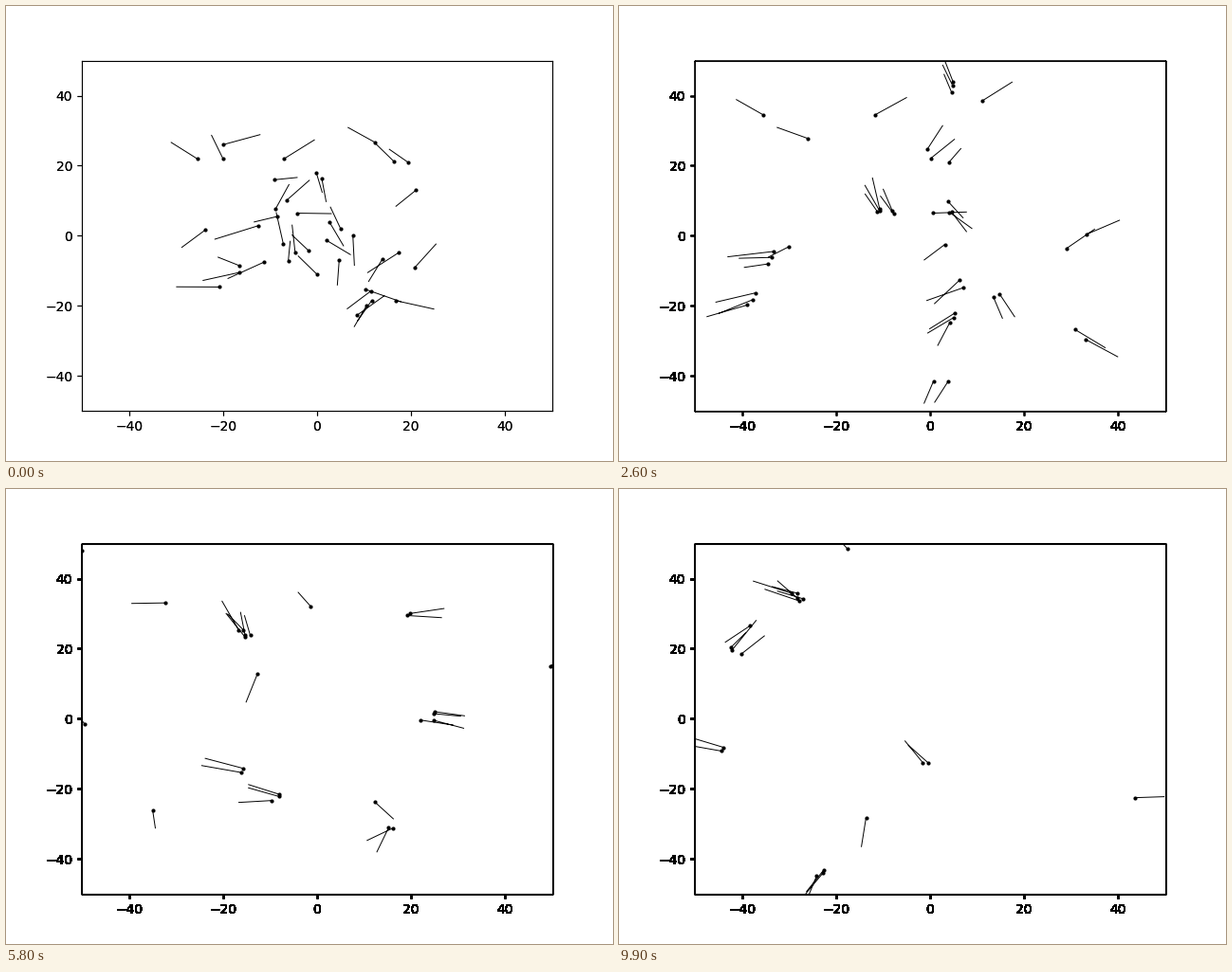
A matplotlib script that plays this animation: 640x480 px, repeating every 10000 ms.

```python
import numpy as np
import matplotlib.pyplot as plt
from matplotlib.animation import FuncAnimation

FRAMES, INTERVAL = 100, 100
STEP = 33     # frames between two key points of a route
SETTLE = 15   # frames a scattered flock needs to draw together

rng = np.random.default_rng(7)
t = np.arange(FRAMES)
tracks, lengths = [], []


def route(keys):
    """Smooth curve through the key points, straight on after the last."""
    keys = np.array(keys, float)
    slope = np.gradient(keys, axis=0)
    i = np.minimum(t // STEP, len(keys) - 2)
    u = (t / STEP - i)[:, None]
    s = np.minimum(u, 1)
    curve = ((1 + 2 * s) * (1 - s) ** 2 * keys[i] + s * (1 - s) ** 2 * slope[i]
             + s * s * (3 - 2 * s) * keys[i + 1] - s * s * (1 - s) * slope[i + 1])
    return curve + (u - s) * slope[-1]


def flock(size, spread, *keys):
    """Boids that start scattered, gather on one route and wander a little."""
    path = route(keys)
    for _ in range(size):
        offset = spread * rng.uniform(-1, 1, 2)
        phase = rng.uniform(0, 2 * np.pi, 2)
        scatter = offset * np.exp(-t / SETTLE)[:, None]
        wander = 0.8 * (np.sin(0.15 * t[:, None] + phase) - np.sin(phase))
        tracks.append(path + scatter + wander)
        lengths.append(rng.normal(7.2, 1.2))


# crossing to the right
flock(4, 8, (-1, 10), (5, 6), (30, -1), (57, -7))
flock(2, 4, (-6.5, 10.5), (2, 26), (25, 29.5), (55, 26))
flock(1, 0, (21, 13), (2, -5), (17, -26), (43, -21.5))
flock(2, 5, (5, 0), (16, -22), (14, -33), (-1, -14))

# drifting to the left
flock(5, 6, (-3, -6), (-11, 11), (-17, 28), (-28, 35))
flock(3, 7, (9, -13), (2, -26), (-13, -23), (-24, -44))
flock(2, 8, (15, -6), (4, -16), (-21, -13), (-43, -8))
flock(3, 9, (-21, 0), (-38, -6), (-52, 3), (-41, 20))
flock(1, 0, (-20, 22), (-26, 29), (-33, 32), (-37.5, 25.5))
flock(1, 0, (-20, 26), (-9, 34), (-13, 6), (-13, -27))
flock(1, 0, (-9, 16), (4, 22), (-6, 36), (-19, 49))
flock(1, 0, (-8.5, 5.5), (-33, -5), (-33, -32))

# leaving the stage early
flock(3, 7, (13, 20), (2, 48))
flock(1, 0, (-7, 22), (16, 42))
flock(1, 0, (-25.5, 22), (-40, 36))
flock(3, 8, (-18, -13), (-42, -20))
flock(2, 4, (9.5, -21), (0, -46))
flock(2, 8, (16, -15), (36, 3))
flock(2, 6, (16, -13), (36, -31))

pos = np.array(tracks)
vel = np.gradient(pos, axis=1)
vel /= np.linalg.norm(vel, axis=2, keepdims=True) + 1e-9
tip = pos + vel * np.array(lengths)[:, None, None]
gap = np.full_like(pos, np.nan)
strokes = np.stack([pos, tip, gap], axis=1)

fig, ax = plt.subplots(figsize=(6.4, 4.8), dpi=100)
ax.set(xlim=(-50, 50), ylim=(-50, 50))
dots, = ax.plot([], [], "k.", ms=4)
lines, = ax.plot([], [], "k-", lw=0.7)

# The axes are painted over themselves on every step, so their edges darken.
fig.canvas.draw()
base = np.array(fig.canvas.buffer_rgba())[..., :3] / 255
ghost = fig.figimage(np.ones_like(base), zorder=-1)


def update(i):
    ghost.set_data(base ** (i + 1))
    dots.set_data(*pos[:, i].T)
    lines.set_data(*strokes[:, :, i].reshape(-1, 2).T)
    return ghost, dots, lines


anim = FuncAnimation(fig, update, frames=FRAMES, interval=INTERVAL,
                     repeat=True, repeat_delay=0, blit=False)
plt.show()
```
